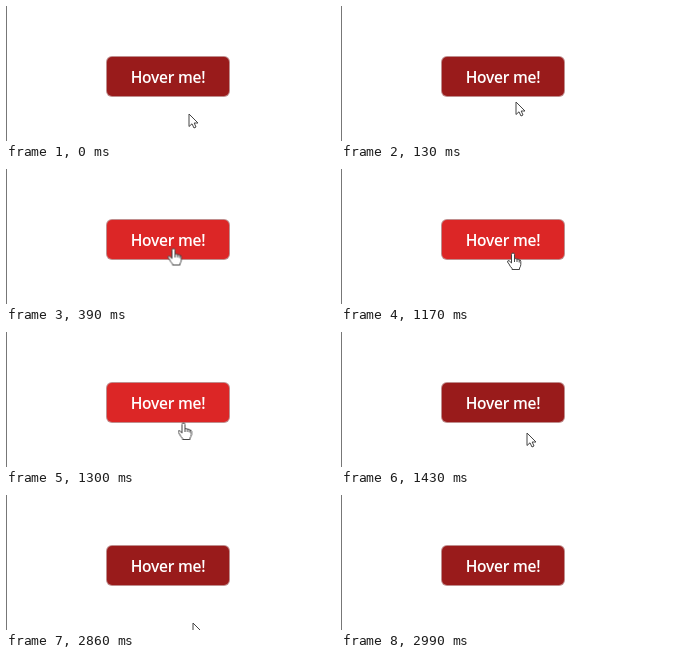
An HTML page for the animation above (3120 ms loop, 329 by 135 pixels).

```html
<!DOCTYPE html>
<html lang="en">
<head>
<meta charset="utf-8">
<title>Button hover</title>
<style>
  html, body {
    margin: 0;
    width: 100%;
    height: 100%;
    overflow: hidden;
    background: #fff;
  }
  .stage {
    position: relative;
    width: 329px;
    height: 135px;
    overflow: hidden;
    background: #fff;
  }
  .edge {
    position: absolute;
    left: 0;
    top: 0;
    width: 1px;
    height: 135px;
    background: #777;
  }
  .button {
    position: absolute;
    left: 101px;
    top: 51px;
    width: 122px;
    height: 39px;
    border-radius: 5px;
    background: #991b1b;
    box-shadow: 0 0 0 1px rgb(130 30 30 / .5);
    color: #fff;
    font: 600 15.5px/40px "Open Sans", "Noto Sans", sans-serif;
    letter-spacing: -.25px;
    text-align: center;
    white-space: nowrap;
    animation: tint 3120ms step-end infinite;
  }
  svg {
    position: absolute;
    left: 0;
    top: 0;
  }
  path {
    fill: #fff;
    stroke: #444;
    stroke-linejoin: round;
  }
  .cursor { animation: move 3120ms step-end infinite; }
  .arrow { animation: arrow 3120ms step-end infinite; }
  .hand { animation: hand 3120ms step-end infinite; }

  /* One step is 130 ms, a 24th of the loop. */
  @keyframes tint {
    0% { background: #991b1b; }
    8.333% { background: #dc2626; }
    45.833% { background: #991b1b; }
  }
  @keyframes move {
    0% { transform: translate(183px, 108px); }
    4.166% { transform: translate(175px, 96px); }
    8.333% { transform: translate(169.5px, 87px); }
    12.5% { transform: translate(167.5px, 79.5px); }
    37.5% { transform: translate(172px, 84px); }
    41.666% { transform: translate(177.5px, 91px); }
    45.833% { transform: translate(186px, 101px); }
    50% { transform: translate(191px, 107.5px); }
    91.666% { transform: translate(187px, 128px); }
    95.833%, 100% { transform: translate(183px, 150px); }
  }
  @keyframes arrow {
    0%, 45.833% { opacity: 1; }
    8.333% { opacity: 0; }
  }
  @keyframes hand {
    0%, 45.833% { opacity: 0; }
    8.333% { opacity: 1; }
  }
</style>
</head>
<body>
<div class="stage">
  <div class="edge"></div>
  <div class="button">Hover me!</div>
  <svg width="329" height="135" viewBox="0 0 329 135">
    <g class="cursor">
      <path class="arrow" d="M0 0V12.5L3 9.8L5 14L7 13L5.2 9H9Z"/>
      <path class="hand" d="M-1.5 1.5Q-1.5 0 0 0T1.5 1.5V6Q3 5 4 6.3Q5.5 5.4 6.2 7Q7.8 6.5 7.8 8.5V11.5Q7.6 14 6.5 15V16.5H-1V15.3Q-3 13.5 -4 11L-5.5 9Q-5.5 7.4 -4 7.6L-1.5 10ZM1.5 6V9M4 6.3V9M6.2 7V9.5"/>
    </g>
  </svg>
</div>
</body>
</html>
```
